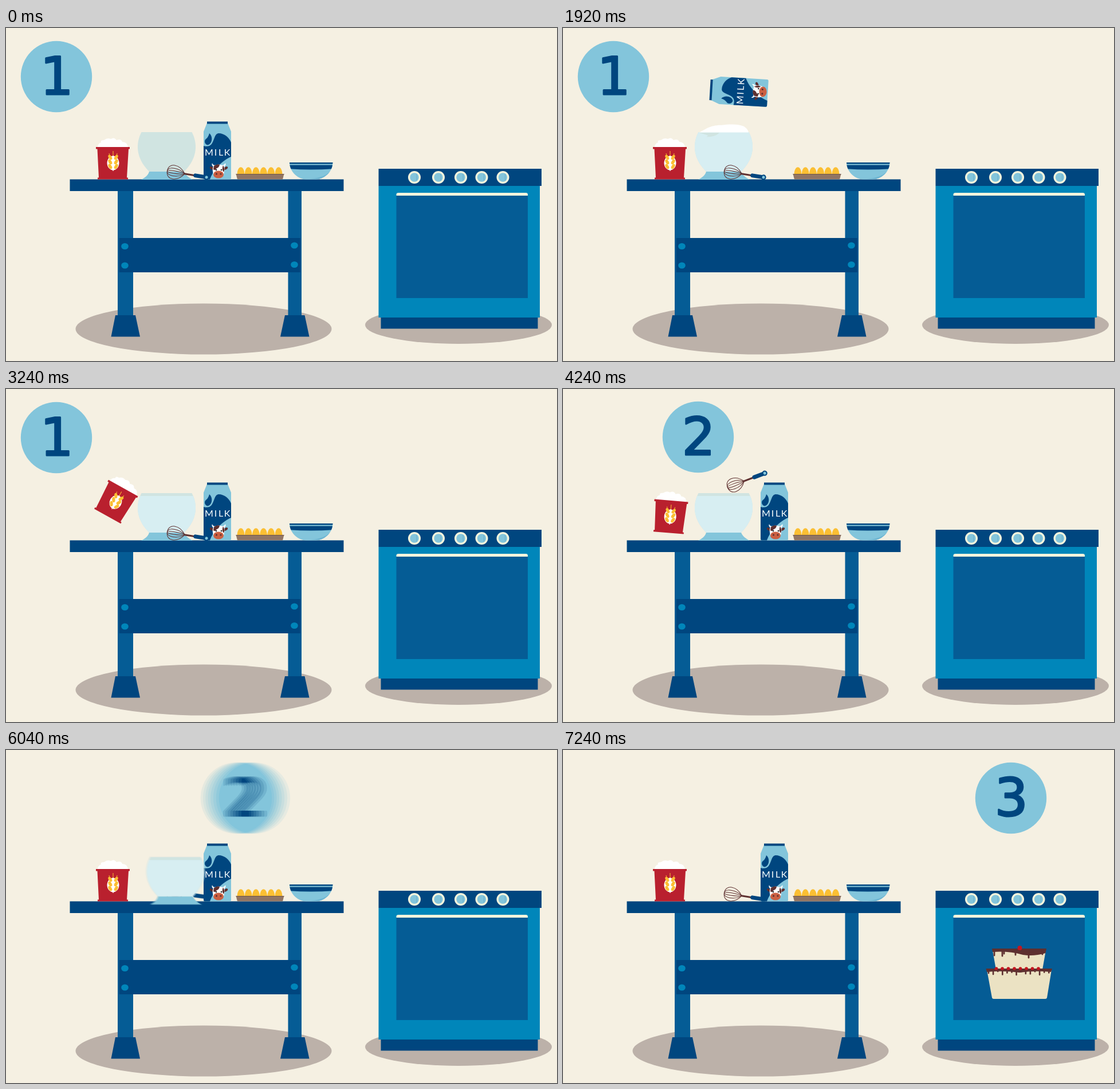
Recreate the animation shown at these times as an HTML page with a canvas. Size 962 px wide and 582 px high, loop 8 s.

```html
<!DOCTYPE html>
<html lang="en">
<head>
<meta charset="utf-8">
<title>Baking steps</title>
<style>
  html, body { margin: 0; width: 100%; height: 100%; overflow: hidden; background: #f5f0e2; }
  canvas { display: block; }
</style>
</head>
<body>
<canvas id="stage" width="962" height="582"></canvas>
<script>
const W = 962, H = 582, LOOP = 8000, STEP = 40;
const CREAM = '#f5f0e2', SKY = '#83c5db', NAVY = '#00467f', STEEL = '#055c95', BLUE = '#0086ba',
      SHADOW = '#bcb1a9', RED = '#b9202e', GLASS = '#d0e4e1', MILK = '#d7eef2', BROWN = '#5e3030',
      YELLOW = '#fbbf33', SPONGE = '#ebe2c3';

const screen = document.getElementById('stage').getContext('2d');
const buffer = document.createElement('canvas');
buffer.width = W;
buffer.height = H;
const ctx = buffer.getContext('2d');

// Symmetric bezier ease; k is the influence of both handles.
function ease(t, start, duration, k = 0.4) {
  const x = Math.min(1, Math.max(0, (t - start) / duration));
  let lo = 0, hi = 1;
  for (let i = 0; i < 24; i++) {
    const s = (lo + hi) / 2, r = 1 - s;
    if (3 * r * r * s * k + 3 * r * s * s * (1 - k) + s ** 3 < x) lo = s; else hi = s;
  }
  return lo * lo * (3 - 2 * lo);
}
const mix = (a, b, p) => a.map((v, i) => v + (b[i] - v) * p);

function rect(color, x1, y1, x2, y2) {
  ctx.fillStyle = color;
  ctx.fillRect(x1, y1, x2 - x1, y2 - y1);
}
function oval(color, x, y, rx, ry = rx, angle = 0) {
  ctx.fillStyle = color;
  ctx.beginPath();
  ctx.ellipse(x, y, rx, ry, angle, 0, 7);
  ctx.fill();
}
function shape(color, d) {
  ctx.fillStyle = color;
  ctx.fill(new Path2D(d));
}
function line(color, width, d) {
  ctx.strokeStyle = color;
  ctx.lineWidth = width;
  ctx.stroke(new Path2D(d));
}
// Draws a thing given in rest coordinates, with its pivot moved to (x, y) and turned.
function place([x, y, degrees = 0], [px, py], draw) {
  ctx.save();
  ctx.translate(x, y);
  ctx.rotate(degrees * Math.PI / 180);
  ctx.translate(-px, -py);
  draw();
  ctx.restore();
}

function table() {
  oval(SHADOW, 345, 526, 223.5, 44.5);
  rect(STEEL, 195, 285, 222, 503);
  rect(STEEL, 492.5, 285, 516, 503);
  rect(NAVY, 111.5, 264.5, 589.5, 285);
  rect(NAVY, 197.5, 367, 514, 427);
  for (const [x, y] of [[207.5, 381.5], [207.5, 415], [503.5, 380], [503.5, 413.5]]) oval(BLUE, x, y, 6.3, 5.6);
  shape(NAVY, 'M191 502H226L234 539.5H183.5ZM487 502H521.5L529.5 539.5H479Z');
}

function oven() {
  oval(SHADOW, 790, 519, 163, 33);
  rect(NAVY, 654.5, 506, 928.5, 525.5);
  rect(BLUE, 650.5, 276, 932, 506);
  rect(NAVY, 650.5, 246, 935, 276);
  for (const x of [713, 755, 794, 830.5, 867.5]) {
    oval('#f6f5dd', x, 261, 11);
    oval(SKY, x, 261, 7.7);
    line('#6aaecb', 1, `M${x + 4} 255V267`);
  }
  rect(STEEL, 681.5, 292, 911, 472);
  shape('#f6f5dd', 'M681.5 293V291Q681.5 288 685 288H907.5Q911 288 911 291V293Z');
}

function flour() {
  shape('#fff', 'M160 209Q160 202 166 200Q164 196 171 196Q177 191 183 194Q189 190 193 196Q201 193 203 199Q212 199 213 209Z');
  shape(RED, 'M157 208H216V211.5H214L211 261.5H213V264.5H160V261.5H162L159.5 211.5H157Z');
  line(YELLOW, 1, 'M187 249V215M182 228L180 219M192 228L194 219');
  oval('#fff', 187, 236, 10.5, 12.5);
  for (const side of [-1, 1])
    for (const y of [226, 234, 242]) oval(YELLOW, 187 + side * 5.2, y, 2.7, 4.8, side * 0.55);
  line('#fff', 1.2, 'M187 223V250');
}

function milk() {
  shape(SKY, 'M351 166H387L393 181V262Q393 264.5 390 264.5H348Q345 264.5 345 262V181Z');
  rect(NAVY, 351, 163.5, 387, 167.5);
  shape(NAVY, 'M345 206C366 212 360 185 371 184C382 184 390 192 393 200V225C378 231 362 248 356 264.5H347Q345 264 345 262Z');
  shape(NAVY, 'M355 184C362 190 360 203 352 204.5C346 203 346 196 349 194C352 192 354 188 355 184Z');
  ctx.fillStyle = '#fff';
  ctx.font = '16px Lato, sans-serif';
  ctx.textAlign = 'center';
  [354.5, 366, 375, 386].forEach((x, i) => ctx.fillText('MILK'[i], x, 222.5));
  shape('#fff', 'M363 243Q358 240 360 236Q361 240 366 240ZM380 243Q385 240 383 236Q381 240 376 240Z');
  oval(BROWN, 359.5, 245, 4, 2.3, 0.5);
  oval(BROWN, 383.5, 245, 4, 2.3, -0.5);
  shape('#fff', 'M362 241Q371 236 381 241Q383 249 379 258H363Q359 249 362 241Z');
  shape(BROWN, 'M363 241Q369 237 373 239Q372 244 368 245Q365 250 362 247ZM379 240Q383 247 380 252Q376 247 379 240Z');
  oval('#222', 367, 248, 1.3);
  oval('#222', 376, 248, 1.3);
  oval('#cb6042', 371, 256, 9, 6.6);
  oval(BROWN, 367.5, 255, 1.6);
  oval(BROWN, 375, 255, 1.6);
}

function eggs() {
  for (let i = 0; i < 6; i++) {
    const x = 410 + i * 13.2;
    shape(YELLOW, `M${x - 6.5} 256C${x - 6} 239 ${x + 6} 239 ${x + 6.5} 256Z`);
  }
  shape('#927563', 'M401.5 255H485.5L483 264.5H404Z');
  line('#705648', 1, 'M401.5 255.5H485.5');
}

function dish() {
  ctx.save();
  ctx.clip(new Path2D('M495 235H570.5C570 253 554 264.5 541 264.5H524C511 264.5 495.5 253 495 235Z'));
  rect(SKY, 490, 230, 575, 266);
  shape('#6db5d2', 'M570 245C562 258 548 262 530 264H570Z');
  rect(NAVY, 490, 235, 575, 237.5);
  shape(NAVY, 'M490 239.5H575V246Q532 249 490 246Z');
  ctx.restore();
}

function glassBowl(t) {
  const swell = t > 1540 && t < 2380 ? Math.sin(Math.PI * (t - 1540) / 840) : 0;
  const body = new Path2D('M236.5 182C227 200 225 226 250 251H311C336 226 334 200 324.5 182Z');
  ctx.fillStyle = GLASS;
  ctx.fill(body);
  const level = 251 - 64 * ease(t, 1180, 360) - 5 * swell;
  ctx.save();
  ctx.clip(body);
  rect(MILK, 225, level, 335, 252);
  ctx.restore();
  if (swell) {
    ctx.save();
    ctx.translate(0, 183 * (1 - swell));
    ctx.scale(1, swell);
    shape('#fff', 'M238 182.5C247 178 257 169 277 169.5C290 168 306 167 316 172Q323 177 324 182.5Z');
    shape(GLASS, 'M238 183H273C268 189 260 190 250 190.5C258 187 248 187 238 183Z');
    ctx.restore();
  }
  shape(SKY, 'M250 251H311C314 258 320 262 326 265H236C242 262 248 258 250 251Z');
}

function whisk() {
  for (const h of [-16, -9, -3, 3, 9, 16]) line(BROWN, 1, `M-4 0C-15 ${h} -35 ${h} -35 0`);
  line(BROWN, 3, 'M-6 0H14');
  ctx.lineCap = 'round';
  line(NAVY, 7, 'M15 0H33');
  ctx.lineCap = 'butt';
  oval(NAVY, 34.5, 0, 4.6);
  oval(SKY, 34.5, 0, 2.5);
}

function cake() {
  shape(SPONGE, 'M750 350H843L837 384H756ZM740 384H853L845 433Q844.5 435 842 435H752Q749.5 435 749 433Z');
  shape(BROWN, 'M749 347H844L842.5 355Q822 361 803 358Q778 351 750 353Z');
  shape(BROWN, 'M738.5 382H854L852 388Q825 385 797 389Q768 385 740 388Z');
  ctx.lineCap = 'round';
  for (const [x, y] of [[753, 359], [767, 360], [770, 356], [790, 358], [813, 363], [837, 357]]) line(BROWN, 2.8, `M${x} 351V${y}`);
  for (let i = 0; i < 14; i++) line(BROWN, 2.6, `M${743 + i * 8.1} 385V${390 + 3 * Math.sin(i * 2.4)}`);
  ctx.lineCap = 'butt';
  for (let i = 0; i < 8; i++) oval('#c4161f', 756.5 + i * 10.5, 382, 2.8);
  oval('#c4161f', 797.5, 346, 4);
}

function badge(t) {
  const [x, y] = mix(mix([88, 85], [236, 84], ease(t, 3900, 320, 0.7)), [782, 84], ease(t, 5560, 1040, 0.8));
  oval(SKY, x, y, 62.2);
  const digit = t < 4060 ? '1' : t < 6080 ? '2' : '3';
  ctx.font = '91px "DejaVu Sans", sans-serif';
  ctx.textAlign = 'center';
  ctx.lineJoin = 'round';
  ctx.lineWidth = 3;
  ctx.fillStyle = ctx.strokeStyle = NAVY;
  ctx.fillText(digit, x + 0.7, y + 31.3);
  ctx.strokeText(digit, x + 0.7, y + 31.3);
}

function scene(t) {
  rect(CREAM, 0, 0, W, H);
  table();
  oven();

  let whiskPose = mix([316, 255.5, 9], [320, 159.5, -21], ease(t, 3900, 340));
  whiskPose = mix(whiskPose, [286, 172, -25], ease(t, 4260, 300));
  whiskPose = mix(whiskPose, [316, 255.5, 9], ease(t, 5580, 600, 0.8));
  if (t > 4560 && t < 5560) whiskPose[0] += 12 * Math.sin((t - 4560) * Math.PI / 200);
  const whiskBehind = t >= 5590;
  const drawWhisk = () => place(whiskPose, [0, 0], whisk);
  if (whiskBehind) drawWhisk();

  const pour = ease(t, 700, 740) - ease(t, 2380, 540);
  const arc = 4 * pour * (1 - pour);
  place([369 - 62 * pour + 19 * arc, 214 - 103 * pour - 31 * arc, -86.6 * pour], [369, 214], milk);
  eggs();
  dish();

  const carry = ease(t, 5880, 776, 0.8), baked = ease(t, 6660, 580);
  if (baked < 1) {
    ctx.globalAlpha = 1 - baked;
    place([516 * carry, 170 * carry], [0, 0], () => glassBowl(t));
  }
  if (baked > 0) {
    ctx.globalAlpha = baked;
    cake();
  }
  ctx.globalAlpha = 1;

  const tip = ease(t, 3040, 440) - ease(t, 3720, 700);
  place([186.5 + 75 * tip ** 3.4, 237 - 91 * tip, 120 * tip ** 1.65], [186.5, 237], flour);
  if (!whiskBehind) drawWhisk();
  badge(t);
}

// The carrying move is averaged over a 20 ms shutter.
function render(t) {
  const samples = t > 5560 && t < 6680 ? 8 : 1;
  for (let i = 0; i < samples; i++) {
    scene(t + ((i + 0.5) / samples - 0.5) * 20);
    screen.globalAlpha = 1 / (i + 1);
    screen.drawImage(buffer, 0, 0);
  }
}

const begin = performance.now();
let shown = -1;
function tick() {
  const t = Math.floor((performance.now() - begin) % LOOP / STEP) * STEP;
  if (t !== shown) render(shown = t);
  requestAnimationFrame(tick);
}
tick();
</script>
</body>
</html>
```
